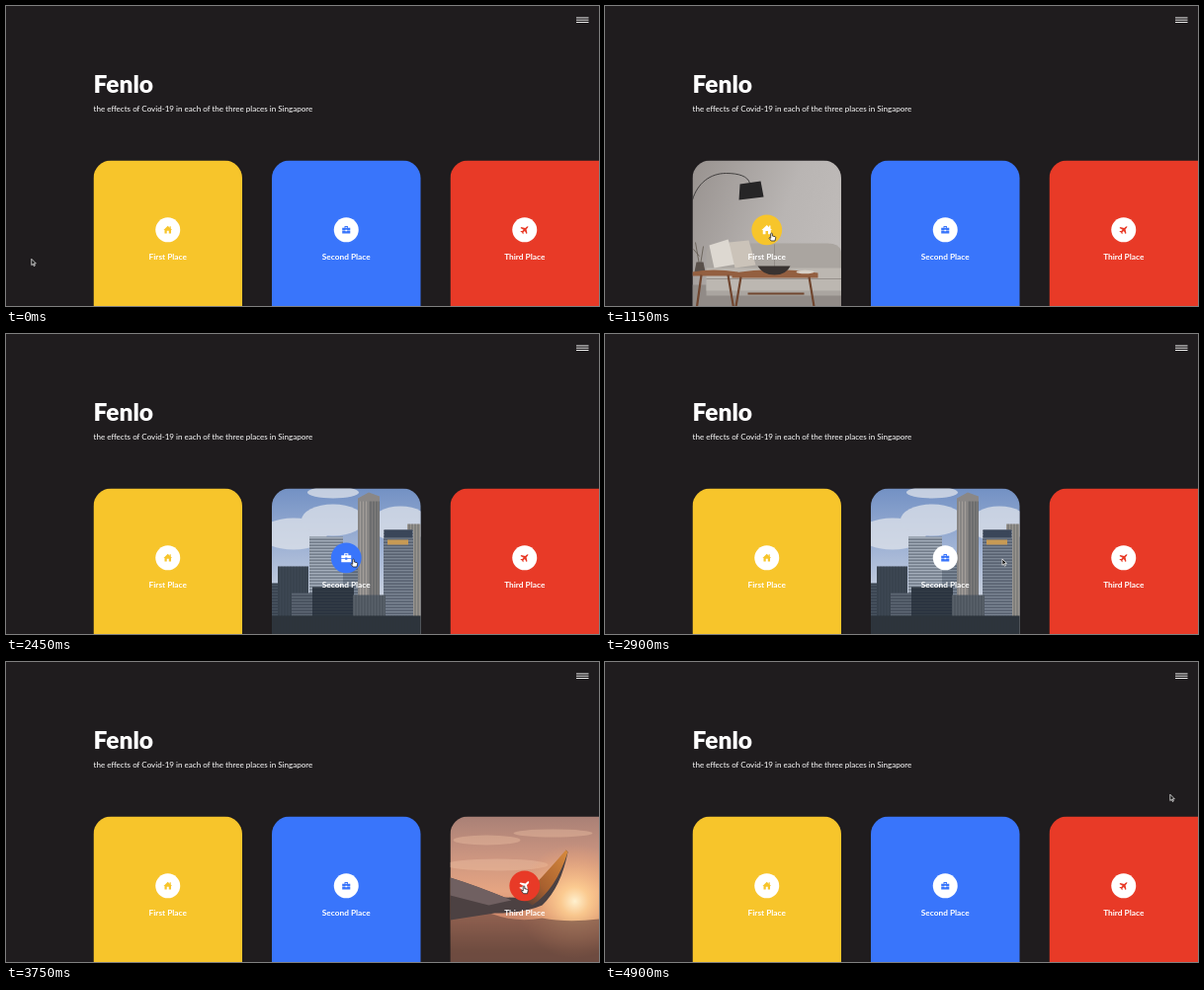
Recreate the animation shown at these times as an HTML page. Size 600 by 304 pixels, loop 4950 ms.

```html
<!DOCTYPE html>
<html lang="en">
<head>
<meta charset="utf-8">
<title>Three places</title>
<style>
  html, body { margin: 0; width: 100%; height: 100%; overflow: hidden; background: #1f1c1e; }
  svg { display: block; width: 100%; height: 100%; }
  text { font-family: Lato, sans-serif; fill: #fff; }
  .title { font-size: 24.5px; font-weight: 900; }
  .lead { font-size: 8.05px; }
  .label { font-size: 8.3px; font-weight: 700; text-anchor: middle; }
</style>
</head>
<body>
<svg viewBox="0 0 600 304">
  <defs>
    <clipPath id="card"><rect width="150.5" height="200" rx="18"/></clipPath>
    <clipPath id="wide"><rect width="180" height="200" rx="18"/></clipPath>
    <linearGradient id="wall" x2="1" y2=".5">
      <stop stop-color="#98928f"/><stop offset=".6" stop-color="#b9b5b3"/><stop offset="1" stop-color="#c0bcba"/>
    </linearGradient>
    <linearGradient id="day" x2="0" y2="1">
      <stop stop-color="#7391c4"/><stop offset=".3" stop-color="#a0b3d5"/><stop offset=".55" stop-color="#c9d1df"/>
    </linearGradient>
    <linearGradient id="dusk" x2="0" y2="1">
      <stop stop-color="#a98076"/><stop offset=".2" stop-color="#cb9580"/><stop offset=".38" stop-color="#e6a582"/>
      <stop offset=".5" stop-color="#cf8a6c"/><stop offset=".68" stop-color="#73503f"/><stop offset="1" stop-color="#4d3a38"/>
    </linearGradient>
    <radialGradient id="sun">
      <stop stop-color="#fff1cf"/><stop offset=".25" stop-color="#ffd193" stop-opacity=".85"/><stop offset="1" stop-color="#f2a070" stop-opacity="0"/>
    </radialGradient>
    <linearGradient id="winglet" x1="1" x2="0" y2="1">
      <stop stop-color="#d78a3c"/><stop offset=".6" stop-color="#a8602f"/><stop offset="1" stop-color="#4a3a38"/>
    </linearGradient>
    <pattern id="floors" width="4" height="3" patternUnits="userSpaceOnUse"><path d="M0 .7H4" stroke="#18222f" stroke-width="1.3" stroke-opacity=".65"/></pattern>
    <pattern id="columns" width="3" height="4" patternUnits="userSpaceOnUse"><path d="M1 0V4" stroke="#2c333b" stroke-opacity=".45"/></pattern>

    <g id="room">
      <rect width="151" height="200" fill="url(#wall)"/>
      <rect y="126" width="151" height="74" fill="#918b87"/>
      <path d="M0 40C5 23 18 13 34 13C47 13 56 16 58 23" fill="none" stroke="#292728" stroke-width=".8"/>
      <path d="M48 24L69 21L72 37L47 40Z" fill="#262526"/>
      <path d="M14 96Q15 84 25 84H137Q151 84 151 96V137H14Z" fill="#aaa5a0"/>
      <path d="M14 109H151V132H14Z" fill="#bcb7b1"/>
      <path d="M83 85V109M14 120H151" stroke="#8d8782" stroke-width=".8"/>
      <path d="M17 86L36 80L45 105L22 109Z" fill="#ddd8d1"/>
      <path d="M37 83L57 81L64 106L43 109Z" fill="#cbc3b9"/>
      <path d="M7 106L3 83M8 106L11 87M7 97L1 90" stroke="#5f574d" fill="none" stroke-width=".8"/>
      <path d="M4 103H11L13 113H2Z" fill="#59504a"/>
      <path d="M0 113Q20 109 46 113V117H0ZM40 114Q84 107 127 114V119H40Z" fill="#935f40"/>
      <path d="M9 116L4 152M36 116L42 152M49 118L42 160M118 118L125 160M56 135H113" fill="none" stroke="#70462f" stroke-width="2.2"/>
      <path d="M66 107H99Q95 116 83 116Q71 116 66 107Z" fill="#393331"/>
      <ellipse cx="114" cy="113" rx="9" ry="1.8" fill="#d8d1c8"/>
    </g>

    <g id="city">
      <rect width="151" height="200" fill="url(#day)"/>
      <g fill="#dfe3ea" opacity=".75">
        <ellipse cx="22" cy="46" rx="34" ry="16"/><ellipse cx="62" cy="32" rx="32" ry="16"/>
        <ellipse cx="130" cy="36" rx="30" ry="18"/><ellipse cx="62" cy="4" rx="26" ry="6"/>
      </g>
      <g id="blocks"></g>
      <path d="M87 10L98 4L109 8V13H87Z" fill="#8a8786"/>
      <path d="M114 42H142V50H114Z" fill="#3a4659"/>
      <path d="M117 52H138V57H117Z" fill="#c79a55"/>
    </g>

    <g id="flight">
      <rect width="151" height="200" fill="url(#dusk)"/>
      <g fill="#f0c3a5" opacity=".4">
        <ellipse cx="37" cy="24" rx="34" ry="5"/><ellipse cx="104" cy="17" rx="40" ry="4"/><ellipse cx="47" cy="49" rx="52" ry="6"/>
      </g>
      <circle cx="126" cy="86" r="58" fill="url(#sun)"/>
      <path d="M0 99Q20 91 43 99Q67 108 93 103Q118 108 151 104V200H0Z" fill="#6d4b41" opacity=".65"/>
      <path d="M0 62Q25 70 55 82L91 83Q104 72 117 34L119 36Q112 72 93 90Q75 98 45 98L0 105Z" fill="#4c4142"/>
      <path d="M0 62Q27 70 62 85L39 90L0 80Z" fill="#706061"/>
      <path d="M72 83Q93 62 117 34L119 36Q107 74 83 90Z" fill="url(#winglet)"/>
    </g>

    <path id="home" d="M0-4.6L2.2-2.5V-4H3.5V-1.3L5 .1H3.8V4.3H1.2V1.2H-1.2V4.3H-3.8V.1H-5Z"/>
    <path id="work" d="M-4.7-2.5H-2V-4.3H2V-2.5H4.7V.5H1V-.2H-1V.5H-4.7ZM-1-2.5H1V-3.4H-1ZM-4.7 1.1H-1V1.8H1V1.1H4.7V4.2H-4.7Z" fill-rule="evenodd"/>
    <path id="travel" transform="rotate(-45)" d="M5.8 0C5.8-.6 4.6-1 3.8-1H2L-.6-5H-2L-.8-1H-3L-4-2.2H-5L-4.3 0L-5 2.2H-4L-3 1H-.8L-2 5H-.6L2 1H3.8C4.6 1 5.8 .6 5.8 0Z"/>
  </defs>

  <rect width="600" height="304" fill="#1f1c1e"/>
  <path d="M577 11.9H589.5M577 14.2H589.5M577 16.5H589.5" stroke="#fff" stroke-width=".9"/>
  <text class="title" x="88.5" y="88">Fenlo</text>
  <text class="lead" x="88.5" y="107">the effects of Covid-19 in each of the three places in Singapore</text>
  <g id="cards"></g>
  <g id="cursor" stroke-width=".8" stroke-linejoin="round">
    <path id="arrow" d="M0 0V6.3L1.5 5L2.5 7.3L3.5 6.8L2.5 4.6H4.5Z" fill="#111" stroke="#eee"/>
    <path id="hand" d="M-.8 4V.3Q0-.6 .8 .3V2.7L3.7 3.4Q4.4 3.7 4.2 4.8L3.5 7.7H-.4L-2.6 4.8Q-2.4 3.6-.8 5Z" fill="#fff" stroke="#222"/>
  </g>
</svg>
<script>
const LOOP = 4950, SLIDE = 400, HEIGHT = 200, TOP = 156.5, ICON_Y = 70.3, MIDDLE = 75.25;
const $ = id => document.getElementById(id);

// x, y, width, colour, texture
const blocks = [
  [0, 96, 12, '#4f5a66', 'floors'], [6, 79, 31, '#3d4753', 'columns'], [38, 49, 34, '#b4bfcc', 'floors'],
  [72, 72, 17, '#8b97a6', 'floors'], [87, 12, 22, '#a39e9a', 'columns'], [98, 9, 11, '#7f7d7c', 'columns'],
  [137, 36, 14, '#99958f', 'columns'], [113, 42, 30, '#8791a0', 'floors'], [20, 106, 23, '#66707c', 'floors'],
  [41, 100, 42, '#363f49', 'floors'], [82, 108, 33, '#59616a', 'columns'], [0, 129, 151, '#2d343b', 'columns']
];
$('blocks').innerHTML = blocks.map(([x, y, w, color, texture]) =>
  [color, `url(#${texture})`].map(fill =>
    `<rect x="${x}" y="${y}" width="${w}" height="${HEIGHT - y}" fill="${fill}"/>`).join('')).join('');

const cards = [
  { x: 88.5, color: '#f7c52b', label: 'First Place', shape: 'card', photo: 'room', icon: 'home', enter: 394, leave: 1590 },
  { x: 269, color: '#3975fb', label: 'Second Place', shape: 'card', photo: 'city', icon: 'work', enter: 1708, leave: 2912 },
  { x: 449.5, color: '#e83a27', label: 'Third Place', shape: 'wide', photo: 'flight', icon: 'travel', enter: 3048, leave: 4200 }
];
$('cards').innerHTML = cards.map(c => `
  <g transform="translate(${c.x} ${TOP})">
    <g clip-path="url(#${c.shape})">
      <use class="photo" href="#${c.photo}"/>
      <rect class="cover" width="151" height="${HEIGHT + 1}" fill="${c.color}"/>
    </g>
    <g class="button"><circle r="12.5"/><use href="#${c.icon}" transform="scale(.86)"/></g>
    <text class="label" x="${MIDDLE}" y="100.8">${c.label}</text>
  </g>`).join('');
cards.forEach((c, i) => {
  for (const part of ['photo', 'cover', 'button']) c[part + 'Node'] = $('cards').children[i].querySelector('.' + part);
});

// cursor stops: time, x, y
const stops = [
  [150, 25.8, 256.3], [700, 168.5, 230.3], [1420, 168.5, 230.3], [1850, 351.5, 228.3], [2740, 351.5, 228.3],
  [3190, 524, 227], [4000, 524, 227], [4300, 570.3, 137], [4500, 570.3, 137], [4800, 571.8, 134.2]
];

const clamp = v => Math.min(1, Math.max(0, v));
const smooth = v => v * v * (3 - 2 * v);

// CSS "ease": cubic-bezier(.25, .1, .25, 1)
function ease(x) {
  x = clamp(x);
  const curve = (a, b, s) => 3 * a * s * (1 - s) ** 2 + 3 * b * s * s * (1 - s) + s ** 3;
  let low = 0, high = 1;
  for (let i = 0; i < 20; i++) {
    const mid = (low + high) / 2;
    if (curve(.25, .25, mid) < x) low = mid; else high = mid;
  }
  return curve(.1, 1, low);
}

function cursorAt(t) {
  const next = stops.findIndex(s => s[0] > t);
  if (next < 1) return (next ? stops[stops.length - 1] : stops[0]).slice(1);
  const a = stops[next - 1], b = stops[next];
  const k = smooth((t - a[0]) / (b[0] - a[0]));
  return [a[1] + (b[1] - a[1]) * k, a[2] + (b[2] - a[2]) * k];
}

function draw(t) {
  const [x, y] = cursorAt(t);
  let pointing = false;
  for (const c of cards) {
    const open = ease((t - c.enter) / SLIDE) - ease((t - c.leave) / SLIDE);
    const hover = Math.hypot(x - c.x - MIDDLE, y - TOP - ICON_Y) < 14;
    const [disc, icon] = c.buttonNode.children;
    pointing = pointing || hover;
    c.photoNode.style.display = open > .001 ? '' : 'none';
    c.coverNode.setAttribute('y', open * HEIGHT);
    c.buttonNode.setAttribute('transform', `translate(${MIDDLE} ${ICON_Y}) scale(${hover ? 1.23 : 1})`);
    disc.setAttribute('fill', hover ? c.color : '#fff');
    icon.setAttribute('fill', hover ? '#fff' : c.color);
  }
  $('cursor').setAttribute('transform', `translate(${x} ${y})`);
  $('arrow').style.display = pointing ? 'none' : '';
  $('hand').style.display = pointing ? '' : 'none';
}

const start = performance.now();
function tick() {
  draw((performance.now() - start) % LOOP);
  requestAnimationFrame(tick);
}
tick();
</script>
</body>
</html>
```
